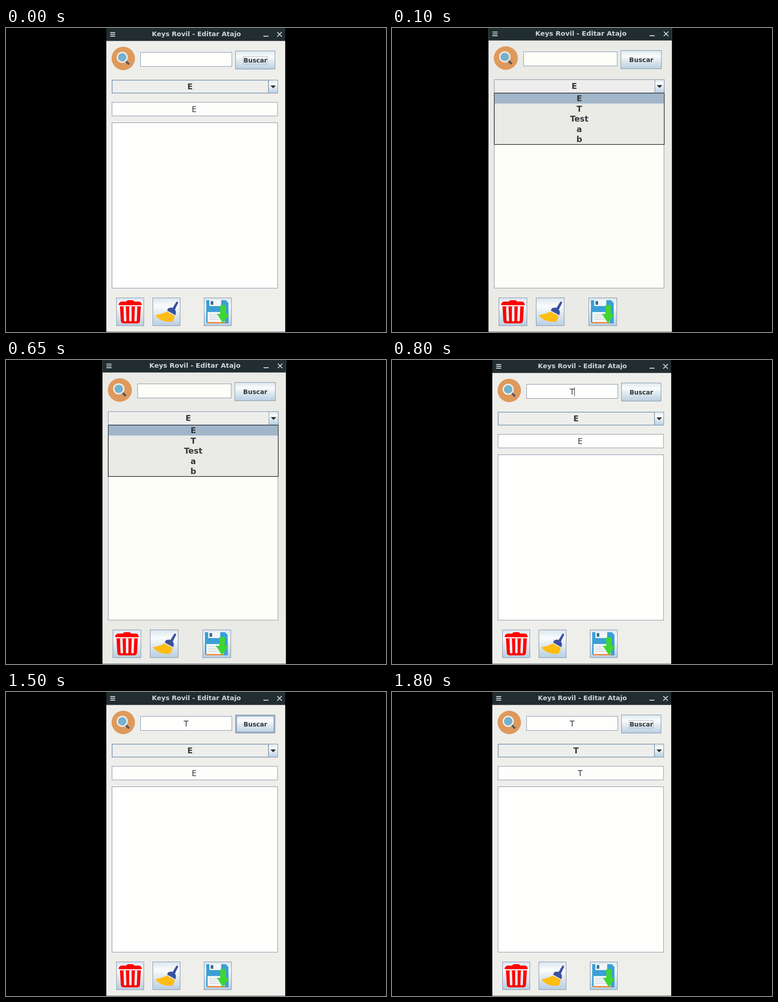
An HTML page for the animation above (1850 ms loop, 837 by 669 pixels).

```html
<!DOCTYPE html>
<html lang="es">
<head>
<meta charset="utf-8">
<style>
html, body { margin: 0; width: 100%; height: 100%; overflow: hidden; background: #000; }
svg { display: block; width: 100vw; height: 100vh; }
text { font-family: "DejaVu Sans", sans-serif; font-size: 17.2px; fill: #33383c; text-anchor: middle; }
.bold { font-weight: bold; }
.field { fill: #fefffd; stroke: #8090a0; }
.button { fill: url(#metal); stroke: #7a8ea3; }
</style>
</head>
<body>
<svg viewBox="0 0 837 669">
  <defs>
    <linearGradient id="metal" x2="0" y2="1">
      <stop offset="0" stop-color="#dce7f0"/>
      <stop offset=".3" stop-color="#fafcfc"/>
      <stop offset=".5" stop-color="#e6edf2"/>
      <stop offset="1" stop-color="#b9cfe2"/>
    </linearGradient>
  </defs>
  <rect width="837" height="669"/>
  <g id="win">
    <rect id="panel" x="221" width="394" height="668" fill="#eeeeeb"/>
    <path d="M221 668.5H615" stroke="#777b7c"/>
    <rect x="221" width="394" height="28.5" fill="#212d31"/>
    <text class="bold" x="517.5" y="18" style="font-size:14.4px;fill:#ced8da;text-anchor:end">Keys Rovil - Editar Atajo</text>
    <path d="M229.500 10H240.500M229.500 14H240.500M229.500 18H240.500M567 18H578M597.500 9L607.500 19M607.500 9L597.500 19" stroke="#d3dcde" stroke-width="1.8"/>

    <circle cx="258.300" cy="67" r="25.800" fill="#df995c"/>
    <path d="M263 72L271 80" stroke="#4c5868" stroke-width="4.500"/>
    <circle cx="256" cy="64.500" r="10.800" fill="#74b1cd" stroke="#f0eee9" stroke-width="3"/>

    <rect class="field" x="296.500" y="53.500" width="201" height="31"/>
    <text id="query" x="396.700" y="76">T</text>
    <path id="caret" d="M402 60.500V79.500" stroke="#333" stroke-width="1.200"/>
    <rect class="button" x="505.500" y="50.500" width="87" height="40"/>
    <rect id="hover" x="507.500" y="52.500" width="83" height="36" fill="none" stroke="#93a9c0" stroke-width="2.500"/>
    <rect id="focus" x="522.500" y="62.500" width="53" height="17" fill="none" stroke="#a3b8cc"/>
    <text class="bold" x="549.200" y="76" style="font-size:13.6px">Buscar</text>

    <rect x="233.500" y="114.500" width="365" height="29" fill="#eeeeed" stroke="#7a8ea3"/>
    <rect id="inner" x="234.500" y="115.500" width="343" height="27" fill="none" stroke="#b4c5d5"/>
    <rect class="button" x="578.500" y="114.500" width="20" height="29"/>
    <path d="M582.500 126.500H594.500L588.500 132.500Z" fill="#25292d"/>
    <text id="selected" class="bold" x="405.300" y="134.500"></text>

    <rect class="field" x="233.500" y="163.500" width="364.500" height="30"/>
    <text id="shortcut" x="414.500" y="184.500"></text>
    <rect class="field" x="233.500" y="208.500" width="364.500" height="364"/>

    <g id="list">
      <rect id="menu" x="233.500" y="144.500" width="365" height="112.500" fill="#eeeeeb" stroke="#171a1c" stroke-width="1.300"/>
      <rect x="234" y="145" width="364" height="22" fill="#a2b6ca"/>
    </g>

    <rect class="button" x="243.500" y="594" width="60" height="61"/>
    <rect class="button" x="323.500" y="594" width="60" height="61"/>
    <rect class="button" x="436.500" y="594" width="60" height="61"/>

    <g fill="#f00">
      <path d="M265 602Q266 599 270 599H278Q281 599 282 602H294Q299 604 299 610H248Q248 604 254 602Z"/>
      <path d="M251 612.500H297L295 645Q294 650 289 650H259Q254 650 253 645Z"/>
    </g>
    <path d="M261.500 615L262.500 643M274 615V643M286.500 615L285.500 643" stroke="#eaf0f4" stroke-width="5.500" stroke-linecap="round"/>

    <path d="M354 624Q343 630 329 632Q336 643 352 646L365 647Q372 640 371 633Z" fill="#fdbd12"/>
    <path d="M357 617Q363 614 367 616L375 603Q379 600 379 605L372 620Q376 624 373 632L355 622Z" fill="#3c519f"/>

    <path d="M441 599H484L490 605V650H444L441 647Z" fill="#3b9fd6"/>
    <path d="M448 599H474V612H448ZM444 625H482V647H444Z" fill="#f2f6f7"/>
    <rect x="451" y="601" width="5.500" height="8" fill="#356d96"/>
    <path d="M448 631H470M448 636H466M448 641H470" stroke="#cbd3d8" stroke-width="1.500"/>
    <path d="M444 648.500H482" stroke="#ee8d45" stroke-width="3"/>
    <path d="M472 610H484V629H491.500L478 650L464.500 629H472Z" fill="#3fd633"/>
  </g>
</svg>
<script>
const LOOP = 1850;
const $ = id => document.getElementById(id);
const show = (id, on) => { $(id).style.display = on ? "" : "none"; };

["E", "T", "Test", "a", "b"].forEach((label, row) => {
  const item = document.createElementNS("http://www.w3.org/2000/svg", "text");
  item.setAttribute("class", "bold");
  item.setAttribute("x", 416);
  item.setAttribute("y", 162 + row * 22.4);
  item.textContent = label;
  $("list").append(item);
});

function draw(now) {
  const t = now % LOOP;
  const within = (from, to) => t >= from && t < to;
  const open = within(50, 800);
  const stretched = within(100, 800);
  const found = t >= 1650;
  const choice = found ? "T" : "E";

  $("win").setAttribute("transform", stretched ? "matrix(1.0254 0 0 1.0016 -14.1 -1.05)" : "");
  $("win").style.filter = stretched ? "blur(.4px)" : "";
  $("panel").setAttribute("fill", stretched ? "#eaeae6" : "#eeeeeb");
  $("menu").setAttribute("fill", stretched ? "#eaeae6" : "#eeeeeb");
  document.querySelectorAll(".field").forEach(f => { f.style.fill = stretched ? "#fdfef8" : ""; });

  show("list", open);
  show("inner", !open);
  show("query", t >= 800);
  show("caret", within(800, 1300));
  show("hover", within(1400, 1650));
  show("focus", t < 50 || found);
  $("selected").textContent = choice;
  $("shortcut").textContent = choice;
  requestAnimationFrame(draw);
}
draw(performance.now());
</script>
</body>
</html>
```
